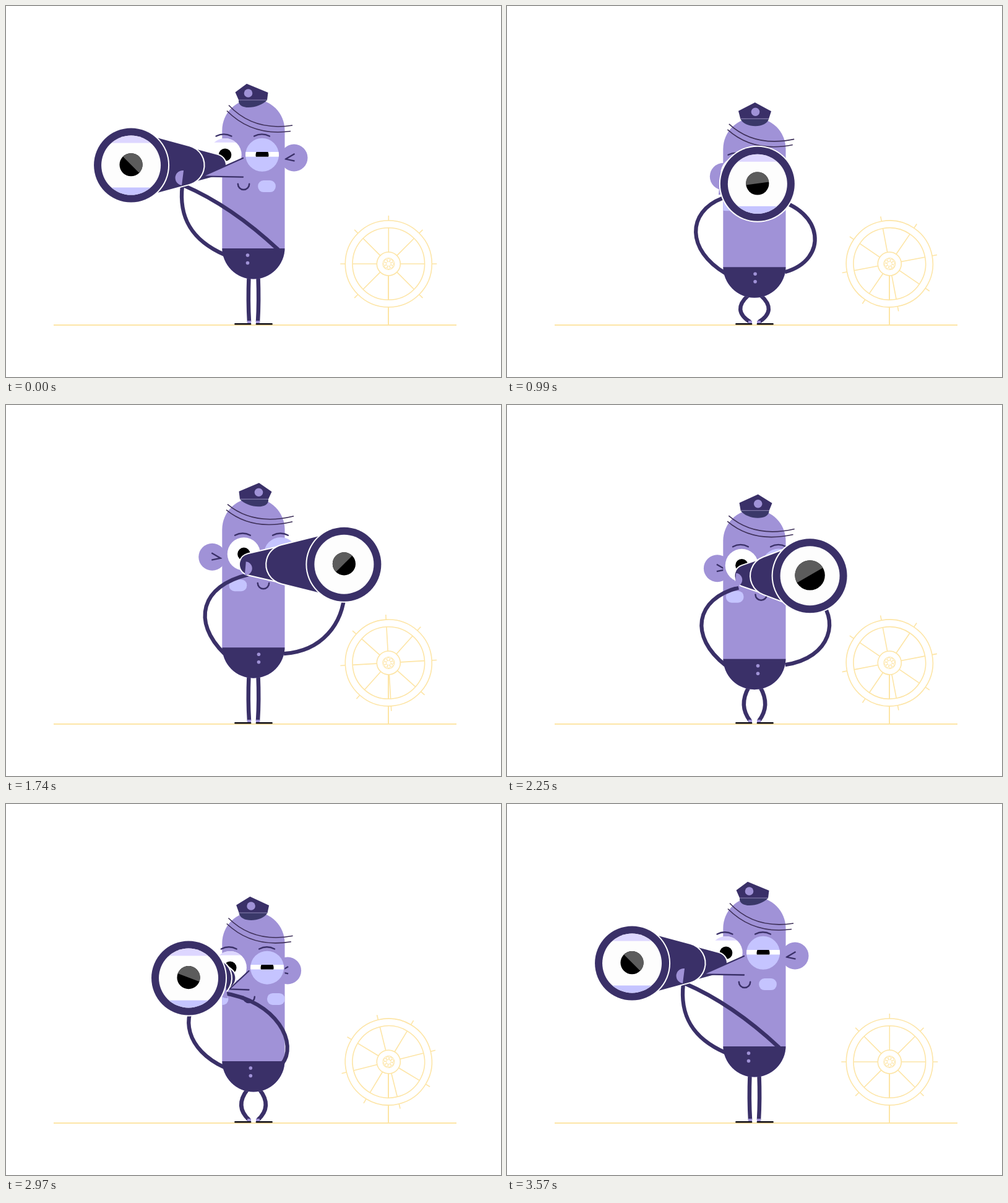
Write an HTML page with a canvas that moves like this. It is 800 px wide and 600 px high and loops after 3.6 s.

```html
<!DOCTYPE html>
<html lang="en">
<head>
<meta charset="utf-8">
<title>Lookout</title>
<style>
html, body { margin: 0; width: 100%; height: 100%; overflow: hidden; background: #fff; }
canvas { display: block; width: 800px; height: 600px; }
</style>
</head>
<body>
<canvas id="stage" width="800" height="600"></canvas>
<script>
const g = document.getElementById('stage').getContext('2d');
const LOOP = 3600, HALF = LOOP / 2, LEAD = 15, TAU = Math.PI * 2;
const DARK = '#3a3068', SKIN = '#a092d7', PALE = '#c5c4ff', LID = '#ddd6ff', GOLD = '#fde5a6';

const clamp = (v, a = 0, b = 1) => Math.min(b, Math.max(a, v));
const smooth = s => { s = clamp(s); return s * s * (3 - 2 * s); };
const ramp = (t, a, b) => smooth((t - a) / (b - a));
const mix = (a, b, p) => a + (b - a) * p;

// Parabola through the left, front and right poses.
const FRONT = 0.585;
function pose(p, a, b, c) {
  return a * (p - FRONT) * (p - 1) / FRONT
    + b * p * (p - 1) / (FRONT * (FRONT - 1))
    + c * p * (p - FRONT) / (1 - FRONT);
}

function fill(color) { g.fillStyle = color; g.fill(); }
function stroke(color, width) { g.strokeStyle = color; g.lineWidth = width; g.stroke(); }
function circle(x, y, r) { g.beginPath(); g.arc(x, y, r, 0, TAU); }
function disc(x, y, r, color) { circle(x, y, r); fill(color); }
function path(points) {
  g.beginPath();
  points.forEach(([x, y], i) => i ? g.lineTo(x, y) : g.moveTo(x, y));
}
function line(color, width, ...points) { path(points); stroke(color, width); }
function curve(color, width, x0, y0, cx, cy, x1, y1) {
  g.beginPath();
  g.moveTo(x0, y0);
  g.quadraticCurveTo(cx, cy, x1, y1);
  stroke(color, width);
}
function clipped(shape, draw) {
  g.save();
  shape();
  g.clip();
  draw();
  g.restore();
}

function wheel(angle) {
  line(GOLD, 2, [77, 516], [728, 516]);
  line(GOLD, 2, [618, 436], [618, 515]);
  g.save();
  g.translate(618.3, 417);
  circle(0, 0, 64.3);
  stroke('#fff', 11);
  g.rotate(angle);
  for (let i = 0; i < 8; i++) {
    line(GOLD, 1.6, [0, -19], [0, -58]);
    line(GOLD, 1.6, [0, -70], [0, -78]);
    circle(0, -6, 2.5);
    stroke(GOLD, 0.9);
    g.rotate(TAU / 8);
  }
  for (const r of [70, 58.3, 19]) { circle(0, 0, r); stroke(GOLD, 1.6); }
  circle(0, 0, 9.5);
  stroke(GOLD, 1);
  g.restore();
}

function legs(dip) {
  for (const side of [-1, 1]) {
    const x = v => 400 + side * v;
    curve(DARK, 6.5, x(7.5 + dip * 0.1), 438 + dip, x(9 + dip * 0.92), 477 + dip / 2, x(7), 511);
    line(SKIN, 6, [x(7), 509], [x(7), 514]);
    g.lineCap = 'round';
    line('#0c0a12', 2.6, [x(5), 514.3], [x(29.5), 514.3]);
    g.lineCap = 'butt';
  }
}

function ear(x, side) {
  disc(x, 245.5, 22, SKIN);
  line(DARK, 2.3, [x + side, 239], [x - 13.5 * side, 247.5], [x + side, 250.5]);
}

function bodyShape() { g.beginPath(); g.roundRect(349.3, 150.5, 101.2, 291, 50.6); }

function body(p) {
  ear(465.5 - 38.5 * p, 1);
  ear(mix(373.5, 333.2, p), -1);
  bodyShape();
  fill(SKIN);
  clipped(bodyShape, () => {
    g.fillStyle = DARK;
    g.fillRect(340, 392, 120, 60);
    for (const x of [334 + 41 * p, 421.5 + 55 * p]) {
      g.beginPath();
      g.roundRect(x - 14.3, 282, 28.6, 19, 9);
      fill(PALE);
    }
  });
  for (const y of [403, 415.5]) disc(390.5 + 18 * p, y, 2.8, SKIN);
}

function hat(p) {
  const l = 376 + 2 * p, r = 422 + 2 * p;
  g.beginPath();
  g.moveTo(l, 152);
  g.bezierCurveTo(mix(374, 390, p), mix(170, 166, p), mix(410, 426, p), mix(166, 170, p), r, 152);
  fill('#3a3869');
  path([[l, 152], [370.5 + 6 * p, 139.5], [389 + 20 * p, 125.7], [423.5 + 6 * p, 140], [r, 152]]);
  fill(DARK);
  line('#8d84b4', 1, [l, 152], [r, 152]);
  disc(391.5 + 17 * p, 141, 6.8, SKIN);

  curve('#3d2f58', 1.6, 360 - 2 * p, 160.5, 400, mix(203, 195.5, p), 463 + 2 * p, mix(193, 179.5, p));
  curve('#3d2f58', 1.6, 357 - p, 169.5, 398, mix(211, 204, p), 460 + 3 * p, mix(202.5, 188.5, p));
}

// Eyelids that cover the top and bottom of an eye.
function lids(x, y, r, open) {
  const edge = r * mix(0.75, 1.02, open);
  g.fillStyle = LID;
  g.fillRect(x - r, y - r - 1, 2 * r, r + 1 - edge);
  g.fillStyle = PALE;
  g.fillRect(x - r, y + edge, 2 * r, r + 1 - edge);
}

function face(p, open) {
  const lx = 354 + 30.5 * p, rx = 414 + 30 * p, y = 240.7;
  clipped(() => circle(lx, y, 26.7), () => {
    g.fillStyle = '#fff';
    g.fillRect(lx - 30, y - 30, 60, 60);
    lids(lx, y, 26.7, open);
    disc(lx, y, 10.3, '#000');
  });
  disc(rx, y, 27, PALE);
  clipped(() => { g.beginPath(); g.rect(rx - 30, y - 4.7, 60, 7.6); }, () => {
    disc(rx, y, 27, '#fff');
    disc(rx, y, 10.5, '#000');
  });
  g.lineCap = 'round';
  curve(DARK, 2.3, lx - 14.5, 210.5, lx - 2, 204, lx + 10.5, 210.5);
  curve(DARK, 2.3, rx - 13, 210.5, rx - 0.5, 204, rx + 12, 210.5);
  g.beginPath();
  g.arc(384 + 32 * p, 287.8, 9.2, 0, Math.PI);
  stroke(DARK, 2.5);
  g.lineCap = 'butt';
}

function arm(hx, hy, ax, ay, bx, by, sx, sy) {
  g.beginPath();
  g.moveTo(hx, hy);
  g.bezierCurveTo(ax, ay, bx, by, sx, sy);
  stroke(DARK, 6.3);
}

function arms(p) {
  const q = (a, b, c) => pose(p, a, b, c);
  arm(285 + 107 * p, 290 - 16 * p, q(279, 290, 315), q(340, 303, 292),
    q(298, 290, 300), q(378, 365, 350), 353, 402);
  arm(q(287, 430, 548), q(290, 282, 300), q(345, 512, 545), q(315, 300, 355),
    q(395, 520, 510), q(352, 380, 398), q(440, 449, 449), q(394, 400, 402));
}

// Outline around a large and a small circle on one level.
function cone(x0, r0, x1, r1, y) {
  const a = Math.acos(clamp((r0 - r1) / (Math.abs(x1 - x0) || 1)));
  const turn = x1 < x0 ? Math.PI : 0;
  g.beginPath();
  g.arc(x0, y, r0, turn + a, turn + TAU - a);
  g.arc(x1, y, r1, turn - a, turn + a);
  g.closePath();
  stroke('#fff', 4);
  fill(DARK);
}

function nose(p) {
  const tip = 317 + Math.min(44, 230 * p), base = 383 + Math.min(9.5, 48 * p);
  path([[base, 246], [tip, 275.3], [base, 276.5]]);
  fill(SKIN);
  g.lineJoin = g.lineCap = 'round';
  stroke(DARK, 2.3);
  g.lineJoin = 'miter';
  g.lineCap = 'butt';
}

function thumb(p) {
  const left = p < 0.5;
  const x = left ? 287 + 250 * p : 281 + 107 * p;
  const y = left ? 266 : 253, h = left ? 24 : 22;
  const lean = left ? mix(-3, 4, clamp(p * 5)) : -2;
  g.beginPath();
  g.moveTo(x, y);
  g.arc(x + lean / 2, y + h / 2, h / 2, -Math.PI / 2, Math.PI / 2, left);
  g.lineTo(x + lean, y + h);
  g.closePath();
  fill(SKIN);
}

function lens(x, y, p, open, pupil) {
  disc(x, y, 62, '#fff');
  disc(x, y, 60, DARK);
  clipped(() => circle(x, y, 48), () => {
    g.fillStyle = '#fdfdfd';
    g.fillRect(x - 50, y - 50, 100, 100);
    lids(x, y, 48, open);
  });
  const a = (45 - 90 * p) * Math.PI / 180;
  disc(x, y - 0.8, pupil, '#000');
  g.beginPath();
  g.arc(x, y - 0.8, pupil, a + Math.PI, a + TAU);
  fill('#5c5c5c');
}

function telescope(p, open, pupil) {
  const y = 257.5, front = 202 + 345 * p, mid = 288 + 165 * p, back = 338 + 57 * p;
  cone(mid, 30, back, 17, y);
  if (p < 0.5) nose(p);
  cone(front, 54, mid, 31.5, y);
  thumb(p);
  lens(front, y, p, open, pupil);
}

function draw(now) {
  const t = (now + LEAD) % LOOP;
  const s = t % HALF / HALF;
  const p = t < HALF ? smooth(s) : 1 - smooth(s);
  const dip = 31.5 * (s < 0.5 ? smooth(s / 0.46) : 1 - smooth(s * 2 - 1));
  const open = ramp(t, 1100, 1400) - ramp(t, 2500, 2800);
  const pupil = 18.6 + 5.6 * (ramp(t, 1800, 2200) - ramp(t, 2400, 2700));

  g.clearRect(0, 0, 800, 600);
  wheel(Math.PI * smooth(t / LOOP));
  legs(dip);
  g.save();
  g.translate(0, dip);
  body(p);
  hat(p);
  face(p, open);
  arms(p);
  telescope(p, open, pupil);
  g.restore();
}

const start = performance.now();
function tick() {
  draw(performance.now() - start);
  requestAnimationFrame(tick);
}
tick();
</script>
</body>
</html>
```
